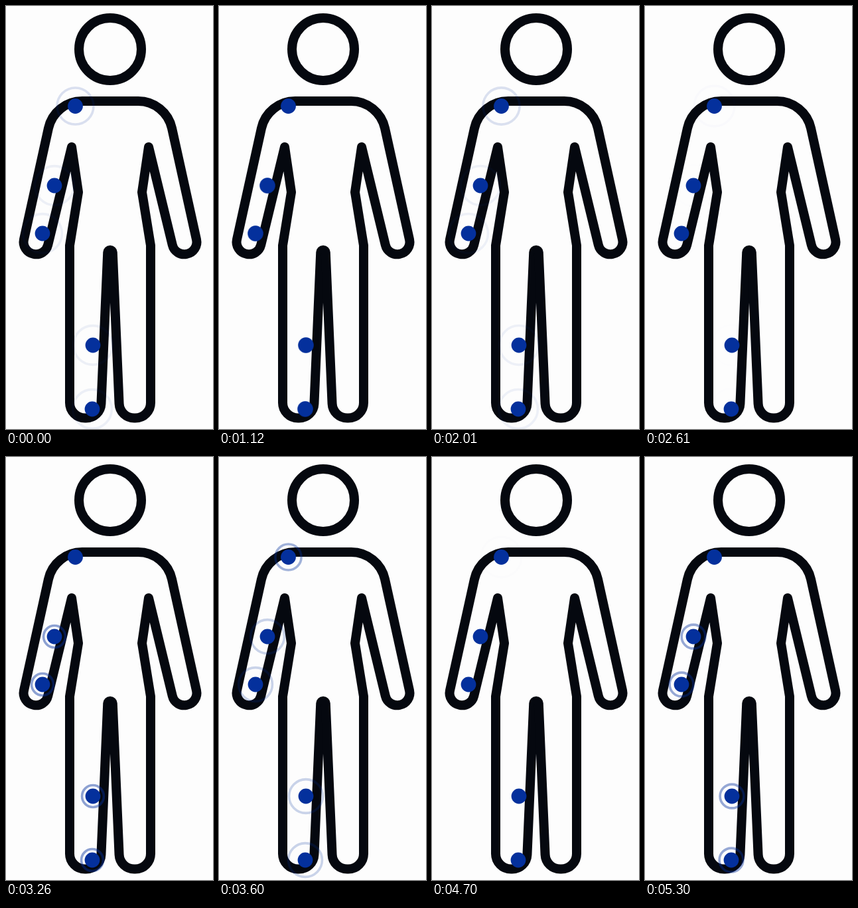
An HTML page with a canvas that plays this animation: 312x636 px, repeating every 5.34 s.

```html
<!DOCTYPE html>
<html lang="en">
<head>
<meta charset="utf-8">
<title>Body points</title>
<style>
  html, body { margin: 0; width: 100%; height: 100%; overflow: hidden; background: #fdfdfd; }
  canvas { display: block; }
</style>
</head>
<body>
<canvas id="stage" width="312" height="636"></canvas>
<script>
const ctx = document.getElementById('stage').getContext('2d');
const LOOP = 5340;
const PULSE = 2000;
const LEAD = 890;   // how far the pulse has run when the loop starts
const LAG = 250;    // the shoulder pulses later than the rest
const AXIS = 157;
const PAPER = '#fdfdfd';
const INK = '#05080f';
const BLUE = '#04309c';

const shoulder = { x: 104.5, y: 150.5 };
const elbow = { x: 73, y: 270 };
const wrist = { x: 55, y: 342 };
const knee = { x: 131, y: 510 };
const ankle = { x: 130, y: 606 };

// Left half of the figure: corners joined by tangent arcs
function halfBody() {
  const path = new Path2D();
  path.moveTo(AXIS + 1, 143);
  path.arcTo(73, 143, 23, 369, 52);       // shoulder
  path.arcTo(23, 369, 59, 376.5, 18.2);   // hand
  path.arcTo(59, 376.5, 99, 212, 18.2);
  path.lineTo(99, 212);                   // armpit
  path.lineTo(109, 280);                  // waist
  path.lineTo(96, 360);                   // hip
  path.arcTo(96, 619.5, 142.5, 619.5, 23); // foot
  path.arcTo(142.5, 619.5, 153.4, 367, 22.6);
  path.arcTo(153.4, 367, AXIS, 367, 3.5); // crotch
  path.lineTo(AXIS + 1, 367);
  return path;
}

const half = halfBody();

function circle(x, y, r) {
  ctx.beginPath();
  ctx.arc(x, y, r, 0, Math.PI * 2);
}

function drawBody() {
  ctx.strokeStyle = INK;
  ctx.lineWidth = 14;
  ctx.lineJoin = 'round';
  circle(AXIS, 65, 47);
  ctx.stroke();
  ctx.stroke(half);
  ctx.save();
  ctx.translate(AXIS * 2, 0);
  ctx.scale(-1, 1);
  ctx.stroke(half);
  ctx.restore();
}

function drawPoint({ x, y }, t) {
  const left = 1 - (t % PULSE) / PULSE;

  ctx.globalAlpha = 0.6 * left ** 3.75;
  ctx.strokeStyle = BLUE;
  ctx.lineWidth = 3.6;
  circle(x, y, 30.5 - 20.8 * left ** 5);
  ctx.stroke();

  ctx.globalAlpha = 1;
  ctx.fillStyle = BLUE;
  circle(x, y, 11.4);
  ctx.fill();
}

function draw(t) {
  ctx.fillStyle = PAPER;
  ctx.fillRect(0, 0, 312, 636);
  drawBody();
  drawPoint(shoulder, t + LEAD - LAG);
  for (const p of [elbow, wrist, knee, ankle]) drawPoint(p, t + LEAD);
}

const start = performance.now();

function tick() {
  draw((performance.now() - start) % LOOP);
  requestAnimationFrame(tick);
}
tick();
</script>
</body>
</html>
```
